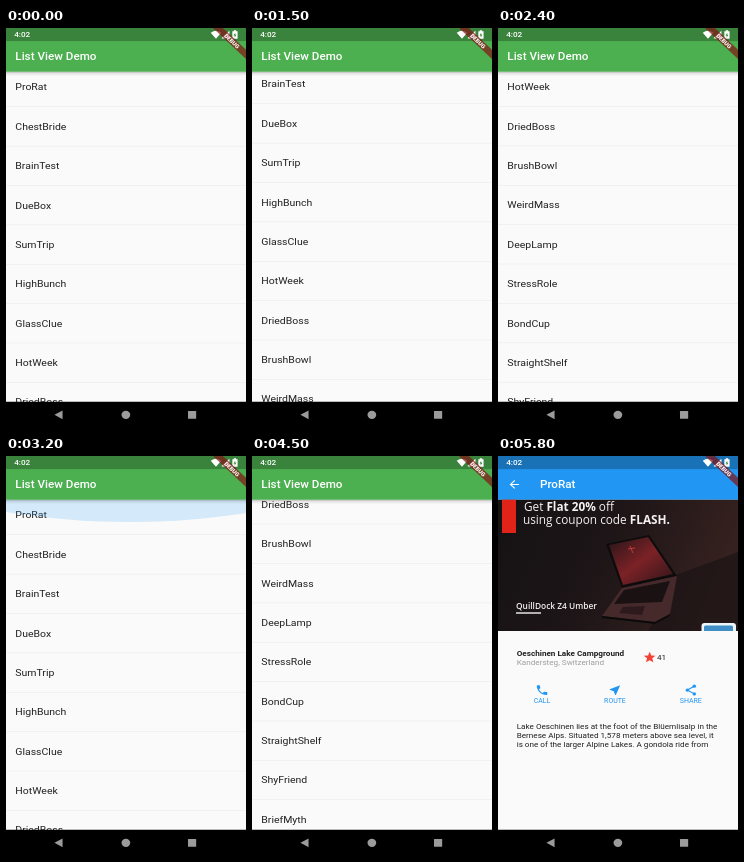
An HTML page for the animation above (8000 ms loop, 240x400 px).

```html
<!DOCTYPE html>
<html lang="en">
<head>
<meta charset="utf-8">
<title>List View Demo</title>
<style>
  html, body { margin: 0; width: 100%; height: 100%; overflow: hidden; background: #fafafa; }
  svg { display: block; width: 100vw; height: 100vh; }
  text { font-family: Roboto, sans-serif; }
  .title { font-size: 20px; font-weight: 500; fill: #fff; }
  .item { font-size: 18px; fill: #212121; }
  .body { font-size: 14px; fill: #212121; }
  .label { font-size: 12px; fill: #2196f3; text-anchor: middle; }
  .photo text { font-family: "Open Sans", sans-serif; fill: #f4f0f0; }
</style>
</head>
<body>
<!-- Laid out in device-independent units of a 411 x 731 screen -->
<svg viewBox="0 0 411.43 731.43" preserveAspectRatio="none">
  <defs>
    <linearGradient id="shade" x2="0" y2="1">
      <stop stop-opacity=".26"/>
      <stop offset=".4" stop-opacity=".09"/>
      <stop offset="1" stop-opacity="0"/>
    </linearGradient>
    <linearGradient id="backdrop" x2="1" y2=".25">
      <stop stop-color="#151214"/>
      <stop offset=".5" stop-color="#1d1517"/>
      <stop offset="1" stop-color="#35211f"/>
    </linearGradient>
    <linearGradient id="screen" x2="1" y2="1">
      <stop stop-color="#251519"/>
      <stop offset=".5" stop-color="#7c2226"/>
      <stop offset="1" stop-color="#2c1519"/>
    </linearGradient>
    <clipPath id="photoClip"><rect y="43.75" width="240" height="131.25"/></clipPath>
  </defs>

  <rect width="411.43" height="731.43" fill="#fafafa"/>
  <g id="list"></g>
  <g id="glow" fill="#2196f3"><circle cx="212" cy="-534.4" r="617.1"/></g>
  <rect y="80" width="411.43" height="8" fill="url(#shade)"/>
  <rect width="411.43" height="80" fill="#4caf50"/>
  <text class="title" x="16" y="59">List View Demo</text>

  <g id="detail">
    <rect width="411.43" height="731.43" fill="#fafafa"/>
    <rect width="411.43" height="80" fill="#2196f3"/>
    <path transform="translate(16 40)" fill="#fff" d="M20 11H7.8l5.6-5.6L12 4l-8 8 8 8 1.4-1.4L7.8 13H20z"/>
    <text class="title" x="72" y="59">ProRat</text>

    <g class="photo" transform="scale(1.71429 1.82857)" clip-path="url(#photoClip)">
      <rect y="43" width="240" height="133" fill="url(#backdrop)"/>
      <path d="M178 119L240 96V176H150z" fill="#1c1315" opacity=".7"/>
      <rect x="4" y="43" width="14" height="34" fill="#e2231a"/>
      <text x="26" y="55.3" font-size="11.8">Get <tspan font-weight="700">Flat 20%</tspan> off</text>
      <text x="25" y="68.3" font-size="11.8">using coupon code <tspan font-weight="700">FLASH.</tspan></text>
      <path d="M108 88L151 79 179 120 124 132z" fill="#0d0b0c"/>
      <path d="M111 89L150 81 175 118 125 129z" fill="url(#screen)"/>
      <path d="M124 132L179 120 172 158 157 166 104 160z" fill="#46292b"/>
      <path d="M126 134L172 125 164 146 116 148z" fill="#1a1113"/>
      <path d="M125 151L147 150 144 159 121 157z" fill="#2d1a1d"/>
      <path d="M104 160L157 166 172 158 172 160 157 168 104 162z" fill="#0c090a"/>
      <path d="M132 90l3 7M130 93l7-1" stroke="#c4393b" stroke-width="1"/>
      <text x="18" y="153" font-size="8.4" font-weight="600">QuillDock Z4 Umber</text>
      <rect x="18" y="156.3" width="25" height="1.4" fill="#f4f0f0"/>
      <rect x="203.5" y="167" width="34.5" height="14" rx="3" fill="#eef5fa"/>
      <rect x="206" y="169.5" width="29" height="10" rx="1.5" fill="#3f8fc6"/>
    </g>

    <text class="body" x="32" y="365" font-weight="700">Oeschinen Lake Campground</text>
    <text class="body" x="32" y="381.5" style="fill:#9e9e9e">Kandersteg, Switzerland</text>
    <path transform="translate(248 356)" fill="#f44336" d="M12 17.3L18.2 21 16.5 14 22 9.2l-7.2-.6L12 2 9.2 8.6 2 9.2 7.5 14 5.8 21z"/>
    <text class="body" x="272.5" y="373">41</text>

    <g fill="#2196f3">
      <path transform="translate(63.5 416)" d="M6.6 10.8c1.4 2.8 3.8 5.1 6.6 6.6l2.2-2.2c.3-.3.7-.4 1-.2 1.1.4 2.3.6 3.6.6.6 0 1 .4 1 1V20c0 .6-.4 1-1 1C10.600 21 3 13.400 3 4c0-.6.5-1 1-1h3.500c.6 0 1 .4 1 1 0 1.200.2 2.400.6 3.600.1.300 0 .700-.200 1z"/>
      <path transform="translate(188.500 416)" d="M21 3L3 10.500v1l6.800 2.700L12.500 21h1z"/>
      <path transform="translate(318.500 416)" d="M6 12L18 5M6 12l12 7" stroke="#2196f3" stroke-width="2"/>
      <g transform="translate(318.500 416)"><circle cx="6" cy="12" r="3"/><circle cx="18" cy="5" r="3"/><circle cx="18" cy="19" r="3"/></g>
    </g>
    <text class="label" x="75.500" y="451.500">CALL</text>
    <text class="label" x="200.500" y="451.500">ROUTE</text>
    <text class="label" x="330.500" y="451.500">SHARE</text>

    <text class="body" x="32" y="499">Lake Oeschinen lies at the foot of the Blüemlisalp in the</text>
    <text class="body" x="32" y="515.300">Bernese Alps. Situated 1,578 meters above sea level, it</text>
    <text class="body" x="32" y="531.500">is one of the larger Alpine Lakes. A gondola ride from</text>
  </g>

  <rect width="411.43" height="24" opacity=".25"/>
  <g fill="#fff">
    <text x="14" y="17" font-size="14" font-weight="500">4:02</text>
    <path d="M351 8.500Q360 1.500 369 8.500L360 19.500z"/>
    <path d="M370 19V18L383 5V19z"/>
    <path d="M388 6h2.500V4h4v2H397v13.500h-9z"/>
  </g>
  <path d="M393 8.500l-3 5h2v4l3-5h-2z" fill="#39833c"/>

  <g transform="translate(411.43 0) rotate(45)">
    <rect x="-40" y="28" width="80" height="12" fill="#b71c1c" fill-opacity=".63"/>
    <rect x="-40" y="28" width="80" height="12" opacity=".2"/>
    <text y="37.600" font-size="10.200" font-weight="900" fill="#fff" text-anchor="middle">DEBUG</text>
  </g>

  <rect y="683.43" width="411.43" height="48"/>
  <g fill="#9b9b9b">
    <path d="M83 707.400L97 699.400V715.400z"/>
    <circle cx="205.500" cy="707.400" r="7.500"/>
    <rect x="312" y="700.400" width="14" height="14" rx="1"/>
  </g>
</svg>
<script>
const LOOP = 8000, STEP = 100, ROW = 72;
const names = ("ProRat ChestBride BrainTest DueBox SumTrip HighBunch GlassClue HotWeek DriedBoss " +
  "BrushBowl WeirdMass DeepLamp StressRole BondCup StraightShelf ShyFriend BriefMyth").split(" ");

// Swipes: start ms, end ms, offset before, offset after
const swipes = [
  [0, 1500, 0, 149.5],
  [1500, 2600, 149.5, 506.5],
  [2700, 3150, 506.5, 0],
  [3500, 4550, 0, 595.5],
  [4500, 5200, 595.5, 0]
];
// Edge glow: start ms, peak ms, end ms, height scale
const glows = [[3000, 3150, 3700, .52], [5000, 5100, 5300, .3]];

const $ = id => document.getElementById(id);
const clamp = x => Math.min(1, Math.max(0, x));
const easeOut = p => 1 - (1 - p) ** 3;

$("list").innerHTML = names.map((name, i) => {
  const y = 80 + i * ROW;
  return `<text class="item" x="16" y="${y + 34.3}">${name}</text>
    <rect y="${y + 63.5}" width="411.43" height="1" opacity=".07"/>`;
}).join("");

function scrollAt(t) {
  const [start, end, from, to] = swipes.filter(s => t >= s[0]).pop();
  return from + (to - from) * easeOut(clamp((t - start) / (end - start)));
}

function glowAt(t) {
  const glow = glows.find(g => t > g[0] && t < g[2]);
  if (!glow) return [0, 0];
  const [start, peak, end, size] = glow;
  const level = t < peak ? (t - start) / (peak - start) : (end - t) / (end - peak);
  return [level, size * (.4 + .6 * level)];
}

function draw(now) {
  const t = Math.floor(now % LOOP / STEP) * STEP;
  $("list").setAttribute("transform", `translate(0 ${-scrollAt(t)})`);

  const [level, size] = glowAt(t);
  $("glow").setAttribute("transform", `translate(0 80) scale(1 ${size})`);
  $("glow").setAttribute("opacity", .19 * level);

  const opened = clamp((t - 5600) / 200);
  $("detail").setAttribute("opacity", opened);
  $("detail").setAttribute("transform", `translate(0 ${80 * (1 - opened)})`);
}

const begin = performance.now();
function tick() {
  draw(performance.now() - begin);
  requestAnimationFrame(tick);
}
tick();
</script>
</body>
</html>
```
